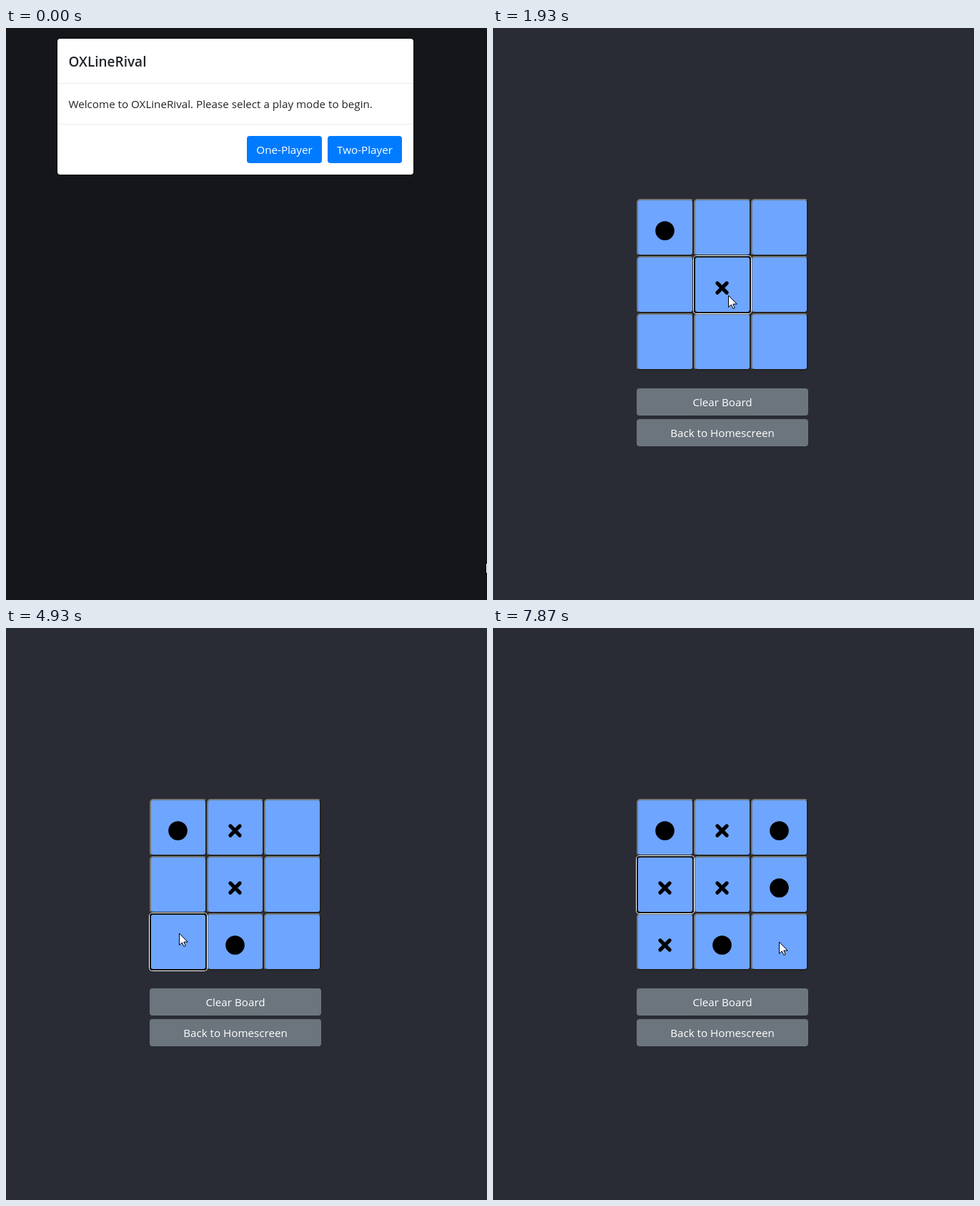
Write an HTML page with a canvas that moves like this. It is 673 px wide and 800 px high and loops after 8000 ms.

```html
<!DOCTYPE html>
<html lang="en">
<head>
<meta charset="utf-8">
<title>OXLineRival</title>
<style>
html, body { margin: 0; width: 100%; height: 100%; overflow: hidden; background: #292c35; }
canvas { display: block; }
</style>
</head>
<body>
<canvas id="stage" width="673" height="800"></canvas>
<script>
const WIDTH = 673, HEIGHT = 800, LOOP = 8000, STEP = 200 / 3;
const CELL = 80, GRID_X = 201, GRID_Y = 239;
const PRESS = 733, CLOSE = 764, MARK_DELAY = 100;
const FONT = '"Open Sans", "Noto Sans", sans-serif';
const NAME = 'OXLineRival';

const stage = document.getElementById('stage').getContext('2d');
const layer = document.createElement('canvas');
layer.width = WIDTH;
layer.height = HEIGHT;
const modal = layer.getContext('2d');

const clamp = v => Math.max(0, Math.min(1, v));
const ease = k => k * k * (3 - 2 * k);
const inside = (p, b) => p.x >= b.x && p.x < b.x + b.w && p.y >= b.y && p.y < b.y + b.h;
const cellAt = i => ({ x: GRID_X + i % 3 * CELL, y: GRID_Y + Math.floor(i / 3) * CELL });

// Pointer glides from rest to rest: start, end, x, y
const glides = [
  [0, 400, 385, 160],
  [800, 1111, 278, 750],
  [1133, 1467, 330, 358],
  [1867, 2200, 322, 515],
  [2333, 2800, 314, 278],
  [3133, 3267, 306, 600],
  [3580, 3800, 406, 300],
  [3900, 4867, 242, 427],
  [5000, 5133, 420, 481],
  [5400, 5733, 238, 362],
  [5800, 6267, 388, 356],
  [6267, 6832, 238, 358],
  [7133, 7533, 378, 445],
  [7533, 7867, 400, 439]
];

const turns = [
  { press: 1800, cross: 4, dot: 0 },
  { press: 3066, cross: 1, dot: 7 },
  { press: 4866, cross: 6, dot: 2 },
  { press: 7000, cross: 3, dot: 5 }
];

const boardButtons = ['Clear Board', 'Back to Homescreen'].map((label, i) =>
  ({ label, x: GRID_X, y: 504 + 43 * i, w: 3 * CELL, h: 38 }));
const modeButtons = ['One-Player', 'Two-Player'].map((label, i) =>
  ({ label, x: 337 + 113 * i, y: 151, w: 105 - i, h: 38 }));

const arrow = new Path2D('M.5 .5V16.5L4.3 13L7 18.5L9.2 17.5L6.8 12.1H11.8Z');
const hand = new Path2D();
for (let i = 0; i < 4; i++) hand.roundRect(3 * i - 2, i && 5 + i, 3.5, 14, 2);
hand.roundRect(-6, 10.5, 4, 6, 2);
hand.roundRect(-4, 12, 13, 9, 3);

function pointerAt(t) {
  let x = 671, y = 747;
  for (const [from, to, endX, endY] of glides) {
    const k = ease(clamp((t - from) / (to - from)));
    x += (endX - x) * k;
    y += (endY - y) * k;
  }
  return { x: Math.round(x), y: Math.round(y) };
}

function box(g, x, y, w, h, r, color) {
  g.beginPath();
  g.roundRect(x, y, w, h, r);
  g.fillStyle = color;
  g.fill();
}

function outline(g, x, y, w, h, r, width, color) {
  g.beginPath();
  g.roundRect(x, y, w, h, r);
  g.lineWidth = width;
  g.strokeStyle = color;
  g.stroke();
}

function text(g, str, x, y, color, font = '15.2px ', align = 'left') {
  g.font = font + FONT;
  g.textAlign = align;
  g.fillStyle = color;
  g.fillText(str, x, y);
}

function button(g, b, color) {
  box(g, b.x, b.y, b.w, b.h, 4, color);
  text(g, b.label, b.x + b.w / 2, b.y + 25, '#fff', undefined, 'center');
}

function drawCell(g, { x, y }) {
  box(g, x, y, CELL, CELL, 5, '#222');
  g.save();
  g.beginPath();
  g.moveTo(x, y);
  g.lineTo(x + CELL, y);
  g.lineTo(x, y + CELL);
  g.clip();
  box(g, x, y, CELL, CELL, 5, '#767676');
  g.restore();
  box(g, x + 2, y + 2, CELL - 4, CELL - 4, 3, '#6ea5ff');
}

function drawCross(g, { x, y }) {
  const cx = x + 39.5, cy = y + 44.5, r = 6.6;
  g.beginPath();
  for (const s of [-1, 1]) {
    g.moveTo(cx - r, cy - s * r);
    g.lineTo(cx + r, cy + s * r);
  }
  g.lineWidth = 5.2;
  g.lineCap = 'round';
  g.strokeStyle = '#000';
  g.stroke();
}

function drawDot(g, { x, y }) {
  g.beginPath();
  g.arc(x + 39.5, y + 44.5, 13.3, 0, Math.PI * 2);
  g.fillStyle = '#000';
  g.fill();
}

function drawFocus(g, { x, y }) {
  outline(g, x - .5, y - .5, CELL + 1, CELL + 1, 4, 1, '#fff');
  outline(g, x + 1, y + 1, CELL - 2, CELL - 2, 3, 2, '#101010');
}

function drawBoard(g, t, p, live) {
  for (let i = 0; i < 9; i++) drawCell(g, cellAt(i));
  const played = turns.filter(turn => t >= turn.press);
  for (const { press, cross, dot } of played) {
    if (t < press + MARK_DELAY) continue;
    drawCross(g, cellAt(cross));
    drawDot(g, cellAt(dot));
  }
  if (played.length) drawFocus(g, cellAt(played[played.length - 1].cross));
  for (const b of boardButtons) button(g, b, live && inside(p, b) ? '#5a6268' : '#6c757d');
}

function drawModal(g, t, p) {
  g.clearRect(0, 0, WIDTH, HEIGHT);
  outline(g, 71.5, 14.5, 499, 191, 4.8, 1, 'rgba(0,0,0,.2)');
  box(g, 72, 15, 498, 190, 4, '#fff');
  g.fillStyle = '#e9ecef';
  g.fillRect(72, 77, 498, 1);
  g.fillRect(72, 134, 498, 1);
  text(g, NAME, 87.5, 54, '#212529', '600 19px ');
  text(g, `Welcome to ${NAME}. Please select a play mode to begin.`, 87.5, 112, '#212529');
  const one = modeButtons[0];
  const ring = 3.2 * clamp((t - PRESS) / 150);
  if (ring) box(g, one.x - ring, one.y - ring, one.w + 2 * ring, one.h + 2 * ring, 4 + ring, 'rgba(38,143,255,.5)');
  for (const b of modeButtons) button(g, b, inside(p, b) ? '#0069d9' : '#007bff');
}

function drawPointer(g, p, overButton) {
  g.save();
  g.translate(p.x, p.y);
  g.strokeStyle = '#000';
  g.fillStyle = '#fff';
  if (overButton) {
    g.lineWidth = 2;
    g.stroke(hand);
    g.fill(hand);
  } else {
    g.lineWidth = 1;
    g.fill(arrow);
    g.stroke(arrow);
  }
  g.restore();
}

function draw(t) {
  const g = stage, p = pointerAt(t);
  const shade = 1 - clamp((t - CLOSE) / 150);
  const open = shade > 0;
  g.fillStyle = '#292c35';
  g.fillRect(0, 0, WIDTH, HEIGHT);
  if (t >= CLOSE) drawBoard(g, t, p, !open);
  if (open) {
    g.fillStyle = `rgba(0,0,0,${shade / 2})`;
    g.fillRect(0, 0, WIDTH, HEIGHT);
    drawModal(modal, t, p);
    const lift = 50 * (1 - (1 - clamp((t - CLOSE) / 300)) ** 1.28);
    g.globalAlpha = shade;
    g.drawImage(layer, 0, -lift);
    g.globalAlpha = 1;
  }
  drawPointer(g, p, (open ? modeButtons : boardButtons).some(b => inside(p, b)));
}

const start = performance.now();
function tick() {
  const t = (performance.now() - start) % LOOP;
  // The picture advances 15 times a second
  draw(Math.floor((t + 4) / STEP) * STEP % LOOP);
  requestAnimationFrame(tick);
}
tick();
</script>
</body>
</html>
```
